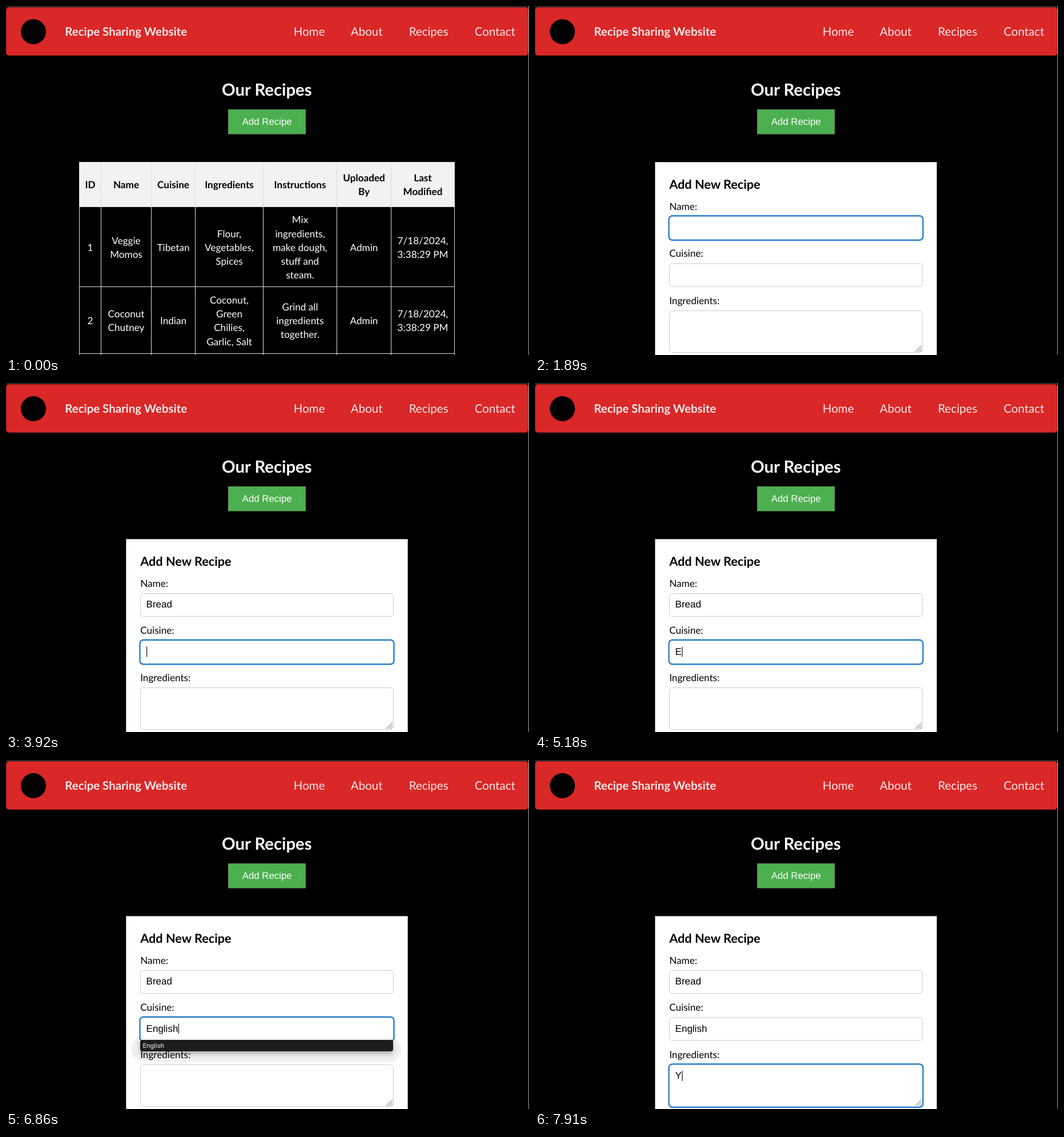
Recreate the animation shown at these times as an HTML page. Size 916x611 px, loop 8000 ms.

```html
<!DOCTYPE html>
<html lang="en">
<head>
<meta charset="utf-8">
<title>Recipe form</title>
<style>
  html, body { margin: 0; width: 100%; height: 100%; overflow: hidden; background: #000; }
  svg { display: block; width: 916px; height: 611px; }
  text { font: 17.15px Lato, sans-serif; fill: #fff; text-rendering: geometricPrecision; white-space: pre; }
  .mid { text-anchor: middle; }
  .bold { font-weight: 700; }
  .dark { fill: #000; }
  .nav { font-size: 20.5px; fill: #f8e9e9; }
  .brand { font-size: 20.4px; }
  .title { font-size: 29.3px; }
  .formTitle { font-size: 21.7px; }
  .ui { font: 17px "Liberation Sans", Arial, sans-serif; }
  .button { font-size: 16.8px; }
  .hint { font: 11px Inter, sans-serif; }
</style>
</head>
<body>
<svg id="stage" viewBox="0 0 916 611">
  <defs>
    <filter id="shade" x="-5%" y="-60%" width="110%" height="260%">
      <feDropShadow dx="0" dy="4" stdDeviation="4" flood-opacity=".3"/>
    </filter>
  </defs>
</svg>
<script>
const LOOP = 8000;
const stage = document.getElementById('stage');

function add(parent, tag, attrs, content) {
  const node = document.createElementNS('http://www.w3.org/2000/svg', tag);
  for (const key in attrs) node.setAttribute(key, attrs[key]);
  if (content !== undefined) node.textContent = content;
  parent.append(node);
  return node;
}
const rect = (parent, x, y, width, height, fill, more) =>
  add(parent, 'rect', { x, y, width, height, fill, ...more });
const line = (parent, d, stroke, width = 1) =>
  add(parent, 'path', { d, stroke, 'stroke-width': width, fill: 'none' });
const label = (parent, x, y, content, cls = '') =>
  add(parent, 'text', { x, y, class: cls }, content);
const show = (node, on) => node.setAttribute('visibility', on ? 'visible' : 'hidden');

// Page header
rect(stage, 0, 0, 916, 611, '#000');
rect(stage, 0, 0, 916, 2, '#29292b');
rect(stage, .5, 2.5, 914, 84, '#da2727', { rx: 4.5, stroke: '#a51d1d' });
line(stage, 'M915.5 0V611', '#aaa');
add(stage, 'circle', { cx: 48, cy: 45, r: 22, fill: '#000' });
label(stage, 210.2, 52, 'Recipe Sharing Website', 'nav brand bold mid');
[[531.2, 'Home'], [631.7, 'About'], [740.1, 'Recipes'], [856.4, 'Contact']]
  .forEach(([x, name]) => label(stage, x, 52, name, 'nav mid'));
label(stage, 456.8, 157, 'Our Recipes', 'title bold mid');
rect(stage, 389.5, 181.5, 135, 42.5, '#4caf50', { stroke: '#5f9a4f' });
label(stage, 457.2, 208, 'Add Recipe', 'ui button mid');

// Recipe table
const table = add(stage, 'g', {});
const edges = [128.5, 166.5, 254.5, 331.5, 450.5, 579.5, 674.5, 785.5];
const stamp = '7/18/2024,|3:38:29 PM';
const rows = [
  [313, 'bold dark', ['ID', 'Name', 'Cuisine', 'Ingredients', 'Instructions', 'Uploaded|By', 'Last|Modified']],
  [422.5, '', ['1', 'Veggie|Momos', 'Tibetan', 'Flour,|Vegetables,|Spices',
    'Mix|ingredients,|make dough,|stuff and|steam.', 'Admin', stamp]],
  [551, '', ['2', 'Coconut|Chutney', 'Indian', 'Coconut,|Green|Chilies,|Garlic, Salt',
    'Grind all|ingredients|together.', 'Admin', stamp]]
];
rect(table, 128, 273, 658, 78, '#f2f2f2');
for (const x of edges) line(table, `M${x} 273V611`, '#ddd');
for (const y of [273.5, 351.5, 491.5, 608.5]) line(table, `M128 ${y}H786`, '#ddd');
for (const [cy, cls, cells] of rows) {
  cells.forEach((cell, col) => {
    const lines = cell.split('|');
    const cx = (edges[col] + edges[col + 1]) / 2;
    lines.forEach((part, i) =>
      label(table, cx, cy + 6.2 + (i - (lines.length - 1) / 2) * 24.2, part, 'mid ' + cls));
  });
}

// Form
const form = add(stage, 'g', {});
rect(form, 210.5, 273.5, 493, 345, '#fff', { stroke: '#aaa' });
const halo = rect(form, 220, 484, 472, 44, '#f0f0f0', { rx: 21 });

function makeField(name, top, height) {
  label(form, 235.2, top - 11.3, name, 'dark');
  const rest = rect(form, 235.5, top + .5, 443, height - 1, '#fff', { rx: 5, stroke: '#ccc' });
  const focus = rect(form, 234.5, top - .7, 445, height + 1.6, '#fff',
    { rx: 6, stroke: '#1673c8', 'stroke-width': 2.2 });
  const text = label(form, 245.6, top + 25.3, '', 'ui dark');
  const caret = rect(form, 246, top + 11, 1.1, 18, '#000');
  return { rest, focus, text, caret };
}
label(form, 235.2, 320, 'Add New Recipe', 'formTitle bold dark');
const fields = [
  makeField('Name:', 368, 41),
  makeField('Cuisine:', 450.5, 41),
  makeField('Ingredients:', 533, 74)
];
line(form, 'M666 605.5L677 594.5M670 605.5L677 598.5M674 605.5L677 602.5', '#555');

const popup = add(form, 'g', {});
rect(popup, 235, 490, 443, 20, '#1e1e1f', { rx: 4, filter: 'url(#shade)' });
label(popup, 239.5, 504.2, 'English', 'hint');

// Each step: [time, typed letters, caret shown]
const scripts = [
  { word: 'Bread', from: 1330, to: 3920, steps: [
    [1330, 0, 1], [1890, 0, 0], [2240, 1, 1], [2450, 1, 0], [2660, 2, 1], [2730, 3, 1],
    [2800, 4, 1], [3010, 5, 1], [3360, 5, 0], [3640, 5, 1]] },
  { word: 'English', from: 3920, to: 7280, steps: [
    [3920, 0, 1], [4480, 0, 0], [4900, 1, 1], [5390, 2, 1], [5530, 3, 1], [5670, 4, 1],
    [5880, 5, 1], [6020, 6, 1], [6090, 7, 1], [6300, 7, 0], [6790, 7, 1]] },
  { word: 'Y', from: 7280, to: LOOP, steps: [
    [7280, 0, 1], [7840, 0, 0], [7910, 1, 1]] }
];

function drawField(field, script, t) {
  const active = t >= script.from && t < script.to;
  let count = 0, blink = 0;
  for (const [at, letters, on] of script.steps) {
    if (t >= at) [count, blink] = [letters, on];
  }
  const typed = script.word.slice(0, count);
  if (field.text.textContent !== typed) field.text.textContent = typed;
  field.caret.setAttribute('x', 246 + (typed ? field.text.getComputedTextLength() : 0));
  show(field.rest, !active);
  show(field.focus, active);
  show(field.caret, active && blink);
}

function draw(t) {
  const open = t >= 420;
  const hinting = t >= 5250 && t < 7280;
  table.style.display = open ? 'none' : '';
  form.style.display = open ? '' : 'none';
  show(halo, hinting);
  show(popup, hinting);
  if (open) fields.forEach((field, i) => drawField(field, scripts[i], t));
}

const start = performance.now();
function tick() {
  draw((performance.now() - start) % LOOP);
  requestAnimationFrame(tick);
}
tick();
</script>
</body>
</html>
```
